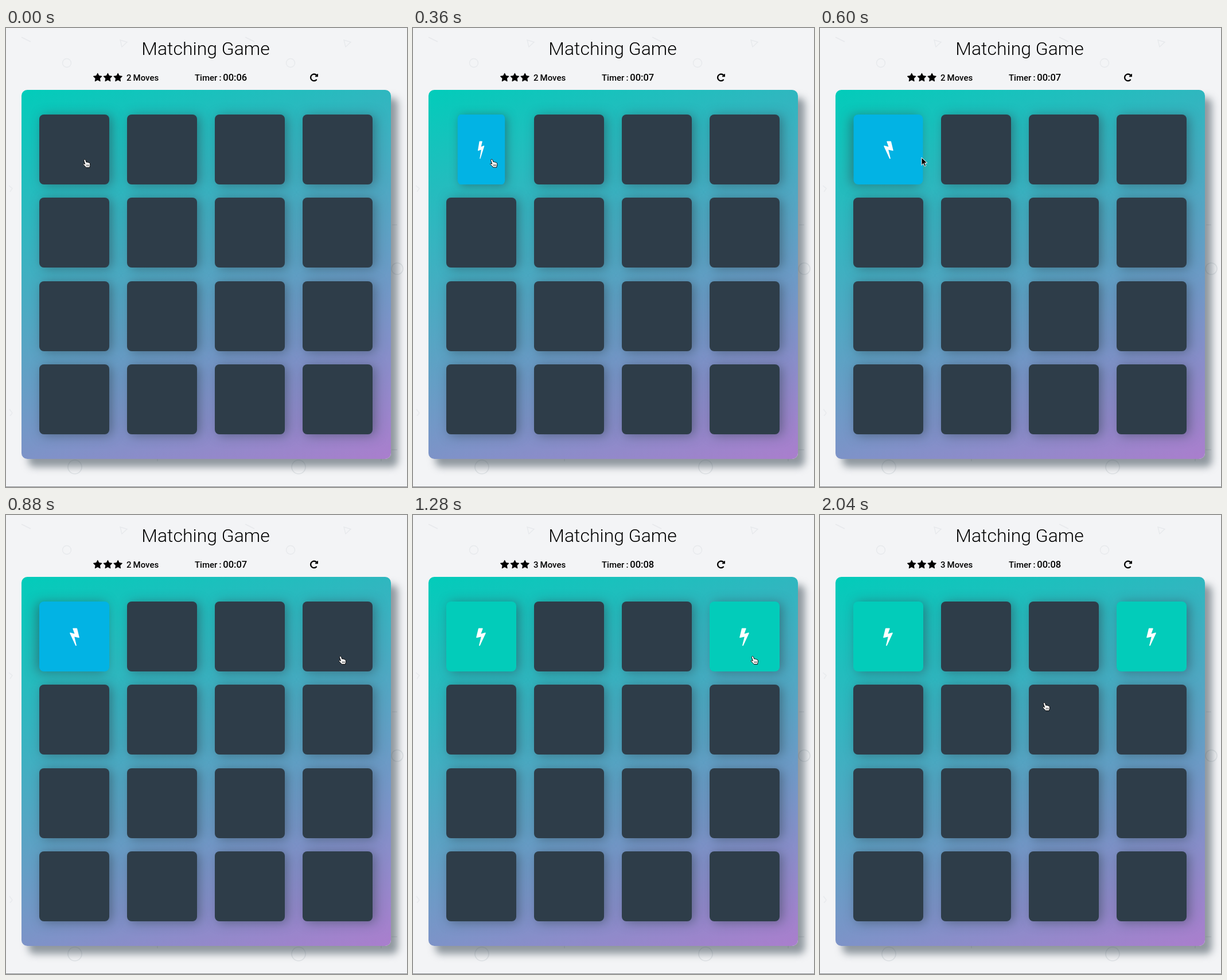
Animation of 699x801 px, one loop 2.08 s. Source, as an HTML page:

```html
<!DOCTYPE html>
<html lang="en">
<head>
<meta charset="utf-8">
<title>Matching Game</title>
<style>
html, body { margin: 0; width: 100%; height: 100%; overflow: hidden; background: #f3f4f6; }
#stage { position: relative; width: 699px; height: 801px; overflow: hidden; }
#stage > svg { position: absolute; left: 0; top: 0; }
#board {
  position: absolute; left: 26.5px; top: 107.5px; width: 644.5px; height: 644.5px;
  border-radius: 10px;
  background: linear-gradient(160deg, #02ccba 0%, #aa7ecd 100%);
  box-shadow: 12px 14px 13px rgba(46, 61, 73, .5);
}
.card {
  position: absolute; width: 122px; height: 122px; border-radius: 8px;
  background: #2e3d49; box-shadow: 5px 2px 19px rgba(46, 61, 73, .5);
}
.card svg { display: block; visibility: hidden; }
.card.up svg { visibility: visible; }
.title { font: 300 32px Roboto, "Liberation Sans", sans-serif; }
.info { font: 500 15px Roboto, "Liberation Sans", sans-serif; }
.clock { font-size: 16.5px; }
</style>
</head>
<body>
<div id="stage">
  <svg width="699" height="801">
    <defs>
      <path id="star" d="M1728 647q0 22-26 48l-363 354 86 500q1 7 1 20 0 21-10.5 35.5t-30.5 14.5q-19 0-40-12l-449-236-449 236q-22 12-40 12-21 0-31.5-14.5t-10.5-35.5q0-6 2-20l86-500-364-354q-25-27-25-48 0-37 56-46l502-73 225-455q19-41 49-41t49 41l225 455 502 73q56 9 56 46z"/>
      <path id="bolt" d="M885 566q18 20 7 44l-540 1157q-13 25-42 25-4 0-14-2-17-5-25.5-19t-4.5-30l197-808-406 101q-4 1-12 1-18 0-31-11-18-15-13-39l201-825q4-16 18-26t31-10h328q19 0 32 12.5t13 29.5q0 8-5 18l-171 463 396-98q8-2 12-2 19 0 34 15z"/>
      <g id="doodles" fill="none" stroke="#e7e9ec" stroke-width="1.4">
        <circle cx="106" cy="61" r="7.5"/>
        <path d="M199 21l12 3.5-9 8.5z"/>
        <path d="M27 16l16 8"/>
      </g>
      <g id="marks" fill="none" stroke="#dfe2e5" stroke-width="1.6">
        <circle cx="120" cy="766" r="12"/>
        <path d="M264 748v8"/>
      </g>
    </defs>
    <use href="#doodles"/>
    <use href="#doodles" x="390"/>
    <use href="#marks"/>
    <use href="#marks" x="390"/>
    <g fill="none" stroke="#dfe2e5" stroke-width="1.6">
      <circle cx="682" cy="420" r="10"/>
      <path d="M673 343.5h9M672 736h10"/>
    </g>
    <path d="M5 275l6 5-4 6M6 665l5 7-4 5" fill="none" stroke="#e9ebee" stroke-width="1.4"/>
    <path d="M0 800.5h699" stroke="#8f9194"/>
    <text class="title" x="348" y="47.3" text-anchor="middle">Matching Game</text>
    <g transform="translate(151.4 78.2) scale(.0093)">
      <use href="#star"/><use href="#star" x="1903"/><use href="#star" x="3806"/>
    </g>
    <g class="info">
      <text id="moves" x="210" y="92">2</text>
      <text x="221.5" y="92">Moves</text>
      <text x="329" y="92">Timer</text>
      <text x="371.5" y="92">:</text>
      <text id="clock" class="clock" x="378.3" y="92">00:06</text>
    </g>
    <path transform="translate(528.8 78.2) scale(.0091)" d="M1664 256v448q0 26-19 45t-45 19h-448q-42 0-59-40-17-39 14-69l138-138q-148-137-349-137-104 0-198.5 40.5t-163.5 109.5-109.5 163.5-40.5 198.5 40.5 198.5 109.5 163.5 163.5 109.5 198.5 40.5q119 0 225-52t179-147q7-10 23-12 15 0 25 9l137 138q9 8 9.5 20.5t-7.5 22.5q-109 132-264 204.5t-327 72.5q-156 0-298-61t-245-164-164-245-61-298 61-298 164-245 245-164 298-61q147 0 284.5 55.5t244.5 156.5l130-129q29-31 70-14 39 17 39 59z"/>
  </svg>
  <div id="board"></div>
  <svg id="pointer" width="699" height="801" style="z-index:1">
    <g id="hand" fill="#fff" stroke="#000" stroke-linejoin="round">
      <path d="M3.2.6c1 0 1.5.7 1.8 1.7l1 3c.8-.7 2-.4 2.3.4.8-.5 1.9-.2 2.2.7.8-.3 1.8 0 2 1.2.4 2 .4 3.5-.3 5l-.5 2h-6c-1-1.5-2.5-3.3-4.6-4.8-1-.8-.5-2.2.8-2 .8.1 1.3.5 1.9 1l-2-6c-.4-1 .2-2.1 1.2-2.2z"/>
      <path d="M6.6 9.3v3.2M8.5 9.3v3.2M10.4 9.3v3.2" stroke-width=".7"/>
    </g>
    <path id="arrow" d="M0 0v13.5l3.2-3 2.1 4.9 2.4-1-2.1-4.8h4.4z" stroke="#fff"/>
  </svg>
</div>
<script>
const LOOP = 2080, STEP = 40;
const OPEN = 280, FLIP = 430, MATCH = 1280, LAG = 100;
const X0 = 57.5, Y0 = 150.5, DX = 153.3, DY = 145.5, SIZE = 122;
const $ = id => document.getElementById(id);

// time, x, y of the pointer tip
const path = [
  [0, 137.3, 228], [280, 137.3, 228], [440, 137.3, 227.2], [520, 146, 226],
  [600, 177, 226], [680, 268, 230], [800, 500, 241], [880, 583, 245],
  [960, 592, 245], [1760, 592, 245], [1840, 560, 257], [1960, 425, 313],
  [2040, 391, 326], [2080, 391, 326]
];

const cards = [];
for (let i = 0; i < 16; i++) {
  const card = document.createElement("div");
  card.className = "card";
  card.style.left = X0 + i % 4 * DX + "px";
  card.style.top = Y0 + Math.floor(i / 4) * DY + "px";
  if (i === 0 || i === 3) {
    card.innerHTML = '<svg width="122" height="122"><use href="#bolt" fill="#fff" transform="translate(52.2 44.2) scale(.0185)"/></svg>';
  }
  $("stage").insertBefore(card, $("pointer"));
  cards.push(card);
}

function bezier(a, b, s) {
  return 3 * a * s * (1 - s) ** 2 + 3 * b * s * s * (1 - s) + s ** 3;
}

function ease(x) {
  if (x <= 0) return 0;
  if (x >= 1) return 1;
  let lo = 0, hi = 1;
  for (let i = 0; i < 24; i++) {
    const mid = (lo + hi) / 2;
    if (bezier(.25, .25, mid) < x) lo = mid; else hi = mid;
  }
  return bezier(.1, 1, lo);
}

function tipAt(t) {
  const i = Math.max(1, path.findIndex(p => p[0] >= t));
  const [a, b] = [path[i - 1], path[i]];
  const k = (t - a[0]) / (b[0] - a[0]);
  return [a[1] + (b[1] - a[1]) * k, a[2] + (b[2] - a[2]) * k];
}

function overClosed(x, y, t) {
  const col = Math.floor((x - X0) / DX), row = Math.floor((y - Y0) / DY);
  if (x - X0 - col * DX > SIZE || y - Y0 - row * DY > SIZE) return false;
  if (row === 0 && col === 0) return t < OPEN + LAG;
  if (row === 0 && col === 3) return t < MATCH + LAG;
  return true;
}

function paint(card, color, scale) {
  card.classList.toggle("up", color !== "#2e3d49");
  card.style.background = color;
  card.style.transform = `scaleX(${scale})`;
}

function draw(t) {
  const matched = t >= MATCH;
  const angle = matched ? 0 : Math.PI * ease((t - OPEN) / FLIP);
  paint(cards[0], matched ? "#02ccba" : t >= OPEN ? "#02b3e4" : "#2e3d49", Math.cos(angle));
  paint(cards[3], matched ? "#02ccba" : "#2e3d49", 1);

  $("moves").textContent = matched ? "3" : "2";
  $("clock").textContent = "00:0" + (t < 200 ? 6 : t < 1200 ? 7 : 8);

  const [x, y] = tipAt(t), hand = overClosed(x, y, t);
  $("hand").style.display = hand ? "" : "none";
  $("arrow").style.display = hand ? "none" : "";
  $("hand").setAttribute("transform", `translate(${x - 3.3} ${y + 1})`);
  $("arrow").setAttribute("transform", `translate(${x} ${y})`);
}

let start;
function tick(now) {
  start ??= now;
  const t = (now - start) % LOOP;
  draw(Math.floor(t / STEP) * STEP);
  requestAnimationFrame(tick);
}
draw(0);
requestAnimationFrame(tick);
</script>
</body>
</html>
```
